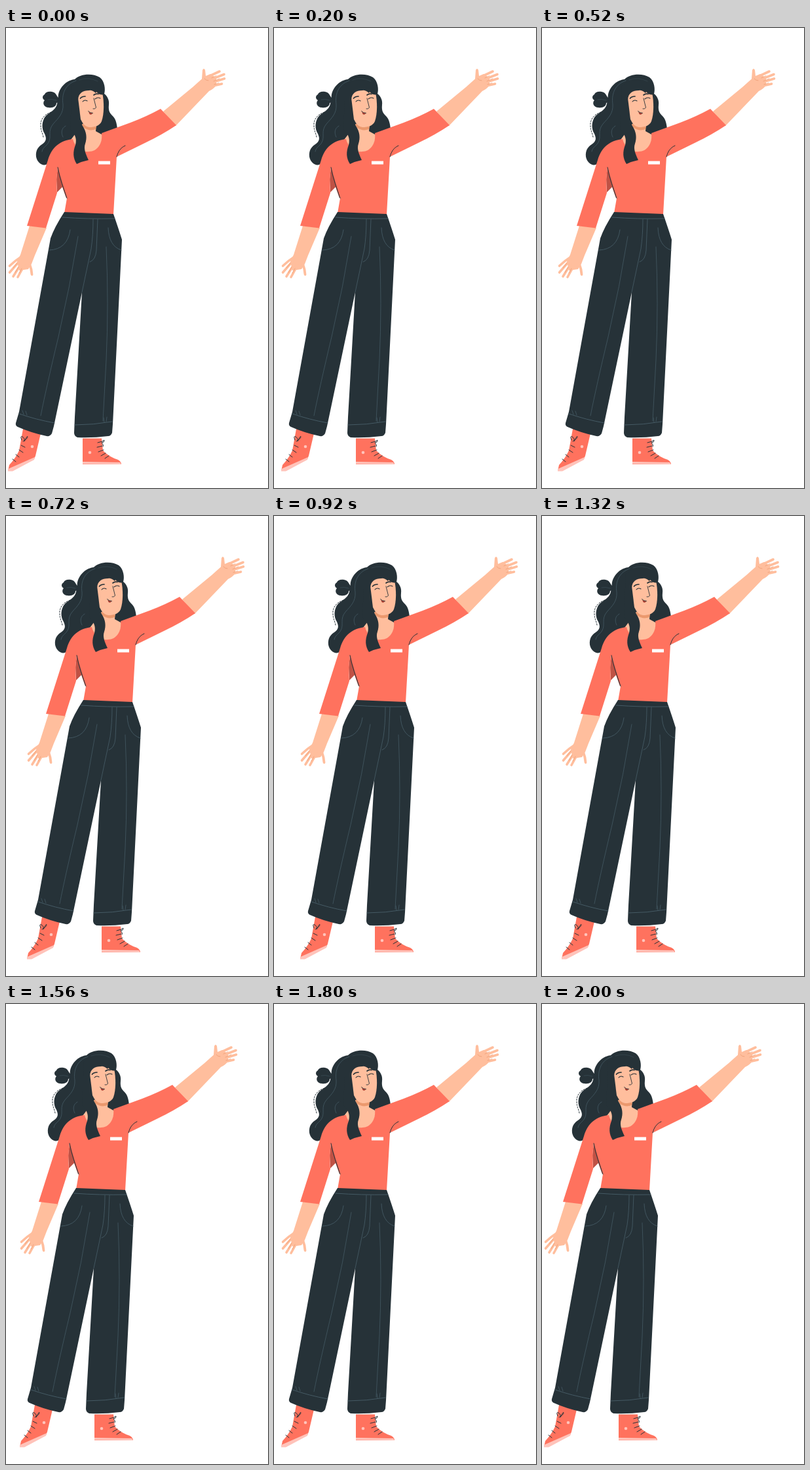
Write an HTML page with a canvas that moves like this. It is 400 by 700 pixels and loops after 2.04 s.

```html
<!DOCTYPE html>
<html lang="en">
<head>
<meta charset="utf-8">
<title>Waving woman</title>
<style>
html, body { margin: 0; width: 100%; height: 100%; overflow: hidden; background: #fff; }
canvas { display: block; width: 400px; height: 700px; }
</style>
</head>
<body>
<canvas id="stage" width="400" height="700"></canvas>
<script>
const ctx = document.getElementById('stage').getContext('2d');
const LOOP = 2040, STEP = 40, SPEED = 0.04;
const DARK = '#263238', SEAM = '#455a64', RED = '#ff725e', SKIN = '#ffbe9d',
      SHADE = '#eb996e', SOLE = '#ffc3ba';

function fill(d, color) {
  ctx.fillStyle = color;
  ctx.fill(new Path2D(d));
}

function line(d, color, width = 1) {
  ctx.strokeStyle = color;
  ctx.lineWidth = width;
  ctx.stroke(new Path2D(d));
}

function dot(x, y, r, color) {
  ctx.fillStyle = color;
  ctx.beginPath();
  ctx.arc(x, y, r, 0, Math.PI * 2);
  ctx.fill();
}

function drawArms() {
  // raised arm and hand
  fill('M240 127L285 90L299 77.500L300 64Q302 60 304 64L305 73L312 70L321 76L321 87' +
    'Q317 93 310 96L259 149Z', SKIN);
  line('M310 73.500L326 66', SKIN, 3.6);
  line('M314 78L333 70.500', SKIN, 3.6);
  line('M316 82.500L333.500 77', SKIN, 3.6);
  line('M316 88L329.500 85', SKIN, 3.6);
  line('M314 76L321 72.500M317 81L326 77M318 86L325 83.500M303 77Q305 80 309 80', SHADE, .7);
  // lowered arm and hand
  fill('M36 301L22 345L17 355L20 369L34 367L39 359L44 346L62 304Z', SKIN);
  line('M22 349Q14 354 5.500 362', SKIN, 3.6);
  line('M22 353L5.500 372', SKIN, 3.6);
  line('M23 359L11 378', SKIN, 3.6);
  line('M28 361L18 379', SKIN, 3.6);
  line('M36 359Q39 367 39.500 375', SKIN, 3.8);
  line('M17 358L11 365M19 364L14 372M24 366L20 373', SHADE, .7);
}

function drawBackHair() {
  fill('M80 107C78 97 88 80 105 78C112 70 132 68 143 75C151 81 152 94 150 100' +
    'C155 104 158 110 157 117C156 127 159 130 163 134C168 139 169 146 170 153' +
    'L147 166L95 174C77 178 70 188 63 207C57 211 48 206 46 196' +
    'C45 186 49 181 55 177C62 172 62 168 59 161C54 153 55 144 58 138' +
    'C62 129 76 127 78 115Z', DARK);
  // bow
  fill('M80 106C76 103 78 99 70 97C64 96 60 98 59 101C55 103 55 108 59 110' +
    'C55 114 58 121 65 121C72 122 77 119 77 114L81 113Z', DARK);
  line('M64 109Q70 107.500 77 110', SEAM, .5);
  ctx.setLineDash([2, 2]);
  line('M69 128C57 132 52 141 53 149C53 156 56 160 57 166', DARK, 1);
  ctx.setLineDash([]);
}

function drawNeck() {
  fill('M96 174L118 145L138 146L137 157L148 163L143 182L126 193L108 190Z', SKIN);
  fill('M116 146L138 148L137 154Q127 158 118 151Z', SHADE);
}

function drawShirt() {
  fill('M79 211L77 230L78 250L86 242L92 259L96 230Z', '#bf5245');
  fill('M102 169C83 171 70 181 64 201L32 301L61 304.500L78 251C77 238 77 226 79 212' +
    'L93 259L89 282L164 284L169 196L214 174Q239 162 260 148L236 123' +
    'Q214 135 190 144L146 160C148 176 139 188 127 188C115 190 105 181 102 169Z', RED);
  line('M79 212C82 229 88 244 93 259', DARK, 1);
  line('M169 196C171 188 175 182 182 179', DARK, 1);
  ctx.fillStyle = '#fff';
  ctx.fillRect(141, 202.5, 18, 5);
}

function drawHead() {
  fill('M109 98Q129 89 147 98C150 113 150 130 146 142C143 149 135 151 127 151' +
    'Q119 150 114 139Z', SKIN);
  // fringe and front lock
  fill('M101 88Q123 70 147 83Q152 91 148 101.500Q142 102 138 97L137 99Q131 94 127 95' +
    'C117 95 111 99 110 109C109 125 111 139 117 149C123 158 124 167 121 176' +
    'C118 184 122 192 126 201Q116 203 108 207C102 198 102 188 106 178' +
    'C109 167 104 160 98 154Z', DARK);
  line('M113.500 107Q116 104 121 104', DARK, 1.7);
  line('M134 102Q137 99.500 141 100.500', DARK, 1.7);
  line('M117 112Q120 108.500 124 111', DARK, 1.1);
  line('M136 108Q140 104.500 144 107', DARK, 1.1);
  line('M134 107L137.500 121Q136 124 133 123', DARK, .9);
  fill('M126 127Q128 129.500 132.500 129.500Q130 133 127.500 131Z', '#a83b2e');
  line('M125.500 126.500Q128 129.500 132.500 129.500', DARK, .9);
  // strands
  line('M107 80C89 86 85 102 87 116C88 130 80 137 72 146C63 157 70 165 65 174' +
    'C62 180 56 181 55 188', SEAM, .8);
  line('M91 149C84 153 84 160 87 166', SEAM, .8);
  line('M112 79Q126 74 140 81', '#37474f', .8);
}

function drawShoes() {
  fill('M26 610L53 617L45 651L43 656L10 674L3 674L5 665Q15 654 20 643Z', RED);
  fill('M3 671L44 653L43 657L10 674.500L3 674.500Z', SOLE);
  dot(40, 637, 2.3, SOLE);
  line('M24 627Q21 620 25 622T28 629Q33 619 33 622T26 629M23 635L29 638' +
    'M20 642L26 646M15 649L20 653M10 656L15 660', DARK, 1);
  fill('M117 624.500L146 624.500L148 643Q158 653 171 657Q176 660 176 664L117 664Z', RED);
  fill('M117 660L174 661L176 664L117 663.500Z', SOLE);
  dot(128, 646, 2.3, SOLE);
  line('M140 631L147 629Q152 625 149 630L146 631Q150 636 148 637M139 638L147 636' +
    'M141 645L149 642M145 651L152 647M151 655L157 651', DARK, 1);
}

function drawTrousers() {
  fill('M89 280L164 283Q172 306 177 322L163 603L162 616Q160 621 156 621' +
    'Q132 624 109 623Q104 621 104 616L105 592L116 402L73 606L70 617' +
    'Q67 622 62 621Q38 616 18 607Q14 605 15 601L20 584L68 320Q74 303 89 280Z', DARK);
  line('M86 288Q125 291 166 290', SEAM);
  line('M133 291Q133 316 130 336L116 402', SEAM, .9);
  line('M140 291L138 338Q137 353 128 356', SEAM, .9);
  line('M66 338Q94 337 98 307', SEAM, .9);
  line('M156 304Q157 332 176 338', SEAM, .9);
  line('M110 317Q98 393 80 470Q62 545 53 590', SEAM, .8);
  line('M153 333Q157 420 153 505L148 598', SEAM, .8);
  line('M20 587Q46 596 74 601M105 604Q133 604 162 599', SEAM);
  line('M25 582L27 588M30 583L32 589M149 593L150 600M154 592L153 599', SEAM, .8);
}

function drawWoman() {
  drawBackHair();
  drawNeck();
  drawArms();
  drawShirt();
  drawHead();
  drawShoes();
  drawTrousers();
}

function frame(now) {
  const t = Math.floor(now % LOOP / STEP) * STEP;
  const shift = Math.round(SPEED * Math.min(t, LOOP - STEP - t));
  ctx.setTransform(1, 0, 0, 1, 0, 0);
  ctx.fillStyle = '#fff';
  ctx.fillRect(0, 0, 400, 700);
  ctx.translate(shift, 0);
  ctx.lineCap = ctx.lineJoin = 'round';
  drawWoman();
}

const start = performance.now();
function tick() {
  frame(performance.now() - start);
  requestAnimationFrame(tick);
}
tick();
</script>
</body>
</html>
```
